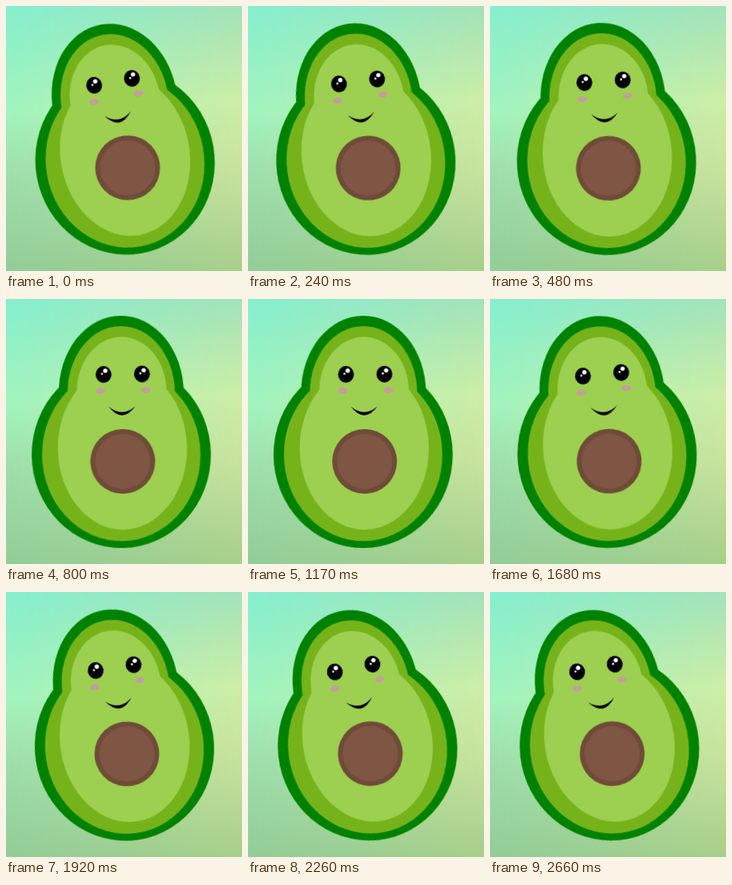
Recreate the animation shown at these times as an HTML page. Size 295 px wide and 332 px high, loop 2.69 s.

```html
<!DOCTYPE html>
<html lang="en">
<head>
<meta charset="utf-8">
<title>Swaying avocado</title>
<style>
  html, body { margin: 0; width: 100%; height: 100%; overflow: hidden; }
  body {
    position: relative;
    background: linear-gradient(#86efcf, #a2f4be 40%, #9ee0ae 62%, #92cd98);
  }
  body::before {
    content: "";
    position: absolute;
    inset: 0;
    background: linear-gradient(#a2e2ba, #b4e6b0 14%, #cdeea6 36%, #c8e29c 62%, #a6cf8a);
    -webkit-mask-image: linear-gradient(90deg, transparent, #000);
    mask-image: linear-gradient(90deg, transparent, #000);
  }
  svg { position: absolute; inset: 0; width: 100%; height: 100%; display: block; }
  #avocado { transform-origin: 144.5px 167px; }
  .skin { fill: #008200; }
  .rim { fill: #76b31a; }
  .flesh { fill: #9dcf50; }
  .cheek { fill: #c69c9f; }
  .shine { fill: #fff; }
</style>
</head>
<body>
<svg viewBox="0 0 295 332">
  <defs>
    <g id="eye">
      <ellipse rx="9.9" ry="10.5"/>
      <circle class="shine" cx="2.2" cy="-4.6" r="2.7"/>
      <circle class="shine" cx="-2" cy="-.8" r="1.3"/>
    </g>
  </defs>
  <g id="avocado">
    <g class="skin">
      <ellipse cx="144.6" cy="117" rx="78" ry="96"/>
      <ellipse cx="143.8" cy="195" rx="112" ry="117"/>
    </g>
    <g class="rim">
      <ellipse cx="144.6" cy="117" rx="67" ry="83"/>
      <ellipse cx="143.8" cy="195" rx="99" ry="108.3"/>
    </g>
    <g class="flesh">
      <ellipse cx="145.2" cy="115.5" rx="56" ry="68"/>
      <ellipse cx="145.3" cy="187" rx="80.7" ry="102"/>
    </g>
    <circle cx="145.6" cy="203.5" r="40.5" fill="#6f4b38"/>
    <circle cx="145.6" cy="203.5" r="34.5" fill="#7e5643"/>
    <use href="#eye" x="122.8" y="94.3"/>
    <use href="#eye" x="170.8" y="94.2"/>
    <ellipse class="cheek" cx="118.6" cy="114.8" rx="5.8" ry="3.7"/>
    <ellipse class="cheek" cx="175.6" cy="114.4" rx="5.8" ry="3.7"/>
    <path d="M128.6 134.6Q145.3 157 162 134.6Q145.3 149 128.6 134.6Z"/>
  </g>
</svg>
<script>
  const LOOP = 2690;   // the sway restarts before its full swing is over
  const HALF = 1400;   // one swing from side to side
  const START = 370;   // point of the swing where the loop begins

  const sway = document.getElementById("avocado").animate(
    [{ transform: "rotate(-12deg)" }, { transform: "rotate(0deg)" }],
    { duration: HALF, easing: "linear", direction: "alternate", iterations: Infinity }
  );
  sway.effect.updateTiming({ easing: "linear" });
  sway.effect.setKeyframes([
    { transform: "rotate(-12deg)", easing: "ease-in-out" },
    { transform: "rotate(0deg)" }
  ]);
  sway.pause();

  function draw() {
    sway.currentTime = START + performance.now() % LOOP;
    requestAnimationFrame(draw);
  }
  draw();
</script>
</body>
</html>
```
